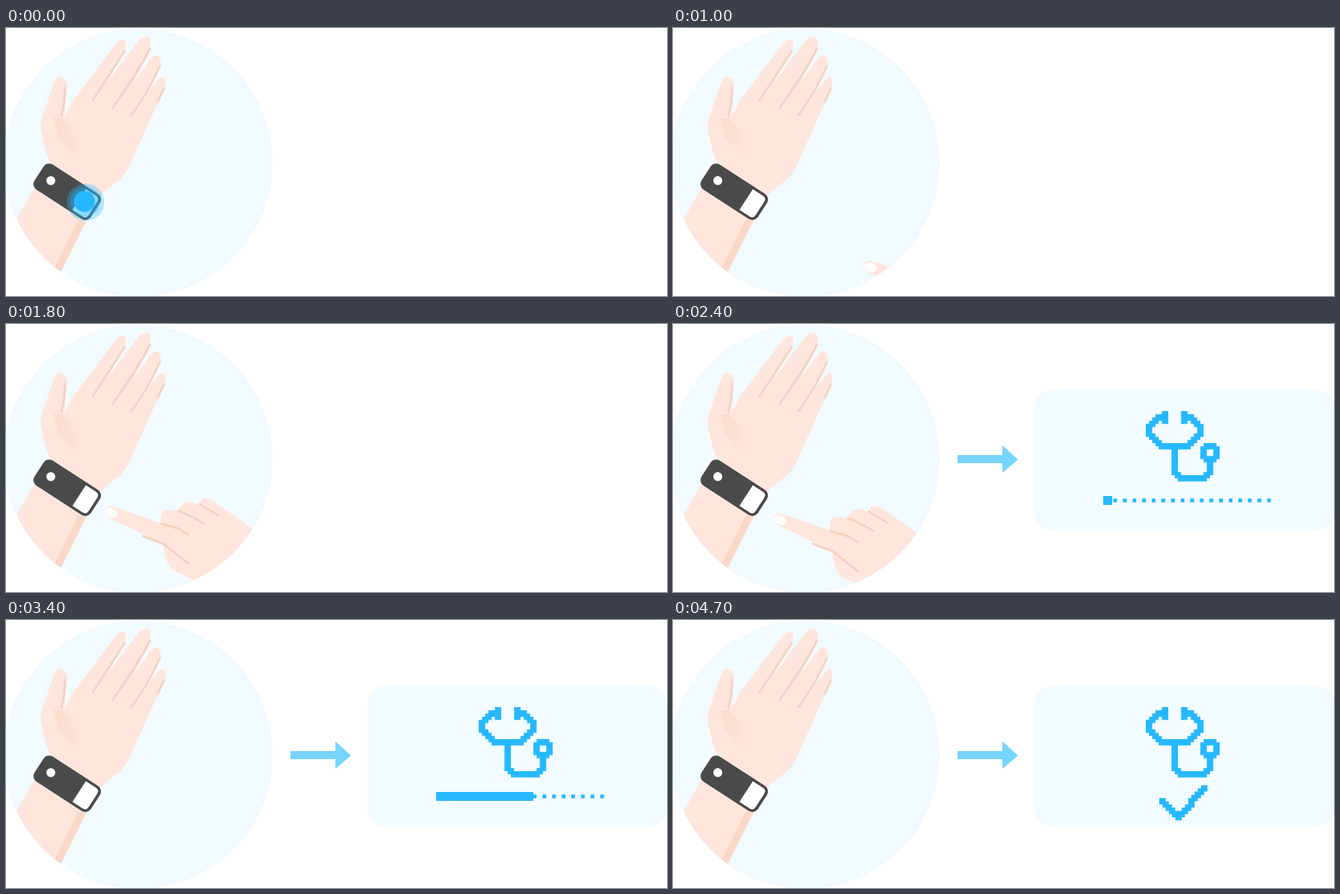
Recreate the animation shown at these times as an HTML page. Size 885x360 px, loop 5.2 s.

```html
<!DOCTYPE html>
<html lang="en">
<head>
<meta charset="utf-8">
<title>Tap the wristband</title>
<style>
  html, body { margin: 0; width: 100%; height: 100%; overflow: hidden; background: #fff; }
  svg { display: block; width: 885px; height: 360px; }
  .soft { filter: blur(.7px); }
  .pale { fill: #f2fbff; }
  .skin { fill: #ffe6dc; }
  .shade { fill: #fad8c7; }
  .crease { fill: none; stroke: #f6d2bf; stroke-width: 3; stroke-linecap: round; }
  .blue { fill: #26b8ff; }
</style>
</head>
<body>
<svg viewBox="0 0 885 360">
  <clipPath id="disc"><circle cx="177" cy="181" r="179.5"/></clipPath>
  <linearGradient id="palm" x1="0" y1="0" x2="1" y2="1">
    <stop offset="0" stop-color="#fbdccd"/>
    <stop offset="1" stop-color="#ffe4da"/>
  </linearGradient>

  <g class="soft">
    <circle class="pale" cx="177" cy="181" r="179" stroke="#edf8fe" stroke-width="1.5"/>
    <g clip-path="url(#disc)">
      <!-- open hand and forearm -->
      <path class="skin" d="M0 281L38 215L60 186L53 165L47 139Q45 129 49 118L64 74Q68 64 74 65Q81 67 82 77L78 119
        L90 97L145 24Q152 14 158 16Q163 20 160 28L134 74L177 18Q183 10 190 12Q196 16 193 25L171 73L193 42
        Q198 36 203 37Q208 40 207 49L186 90L203 71Q208 64 212 67Q215 71 212 81L166 184Q161 196 151 205L130 221
        L106 262L66 342L0 342Z"/>
      <path fill="url(#palm)" d="M63 121L75 121Q89 137 97 156L97 174Q79 158 70 148Z"/>
      <path class="shade" d="M97 258L108 258L70 334L62 328Z"/>
      <path class="crease" d="M79 79Q79 100 74 118M159 31L116 97M193 27Q181 53 143 107M206 51Q192 84 168 117M211 82L203 99"/>

      <!-- wristband -->
      <g transform="translate(82 220) rotate(33)">
        <rect x="-45" y="-20" width="90" height="40" rx="9" fill="#4a4a4a"/>
        <path d="M19-16.5H35Q41-16.5 41-10.5V10.5Q41 16.5 35 16.5H19Z" fill="#fff"/>
      </g>
      <circle cx="60" cy="205" r="6" fill="#fff"/>

      <g id="pulse" class="blue">
        <circle cx="106.5" cy="234" r="25" opacity=".32"/>
        <circle cx="106" cy="233.5" r="20" opacity=".32"/>
        <circle cx="105" cy="233" r="14"/>
      </g>

      <!-- pointing hand -->
      <g id="hand">
        <path class="skin" d="M131 251Q132 244 140 245L152 248L208 268Q205 256 211 251Q217 247 231 252Q233 243 240 240
          Q246 237 259 243Q260 235 267 234Q274 235 285 243L330 275L430 343L330 400L318 378L252 344L224 331
          Q213 322 210 295L150 266Q133 260 131 251Z"/>
        <path class="crease" d="M208 268L231 275L244 283M231 251Q251 259 265 268M259 242L284 257M184 285L212 296L244 322"/>
        <ellipse cx="140.5" cy="253.5" rx="9" ry="6" transform="rotate(25 140.5 253.5)" fill="#fffdfb"/>
      </g>
    </g>

    <path id="arrow" fill="#78d5ff" d="M381 176H441V163L462 182L441 200V187H381Z"/>

    <g id="card">
      <rect class="pale" x="484" y="88" width="401" height="190" rx="25"/>
      <path id="scope" class="blue" transform="translate(633 117) scale(4.3)"/>
      <g id="progress" class="blue">
        <path id="dots"/>
        <rect id="bar" x="576" y="231" height="12"/>
      </g>
      <path id="check" class="blue" transform="translate(651 222) scale(4.3)"/>
    </g>
  </g>
</svg>
<script>
const LOOP = 5200;
const el = id => document.getElementById(id);
const show = (id, on) => el(id).style.display = on ? '' : 'none';
const setPath = (id, d) => el(id).setAttribute('d', d);
const box = (x, y, s) => `M${x} ${y}h${s}v${s}h${-s}z`;

// Traces a polyline with a pen two cells wide, snapped to whole cells.
function pixelLine(points) {
  let d = '';
  for (let i = 1; i < points.length; i++) {
    const [ax, ay] = points[i - 1], [bx, by] = points[i];
    const n = Math.max(Math.abs(bx - ax), Math.abs(by - ay));
    for (let k = 0; k <= n; k++) {
      d += box(Math.round(ax + (bx - ax) * k / n), Math.round(ay + (by - ay) * k / n), 2);
    }
  }
  return d;
}

const half = [[5, 0], [5, 2], [5, 1], [3, 1], [0, 4], [0, 6], [3, 9], [5, 10], [8, 10]];
const mirrored = half.map(([x, y]) => [16 - x, y]);
const tube = [[8, 10], [8, 18], [10, 20], [17, 20], [19, 18], [19, 14]];
const bell = [[18, 10], [20, 10], [21, 11], [21, 13], [20, 14], [18, 14], [17, 13], [17, 11], [18, 10]];
setPath('scope', [half, mirrored, tube, bell].map(pixelLine).join(''));
setPath('check', pixelLine([[0, 4], [5, 9], [13, 0]]));
setPath('dots', Array.from({ length: 17 }, (_, i) => box(589.5 + i * 12.88, 234.5, 5)).join(''));

function handOffset(t) {
  const move = (n, x = 0, y = 0) => [x + 31 * n, y + 17 * n];
  if (t < 1000 || t >= 2900) return null;
  if (t < 2400) return move(Math.max(-1, 9 - Math.floor(t / 200)));
  return move(Math.floor((t - 2400) / 100), 3, 10);
}

function draw(t) {
  show('pulse', t < 2400 && (t >= 2000 || Math.floor(t / 200) % 2 === 0));
  const at = handOffset(t);
  show('hand', at);
  if (at) el('hand').setAttribute('transform', `translate(${at})`);
  show('arrow', t >= 2200);
  show('card', t >= 2400);
  show('progress', t < 4700);
  show('check', t >= 4700);
  const step = Math.min(18, Math.max(0, Math.floor((t - 2400) / 100)));
  el('bar').setAttribute('width', 12 + step * 11.8);
}

let start;
function tick(now) {
  start ??= now;
  draw((now - start) % LOOP);
  requestAnimationFrame(tick);
}
draw(0);
requestAnimationFrame(tick);
</script>
</body>
</html>
```
